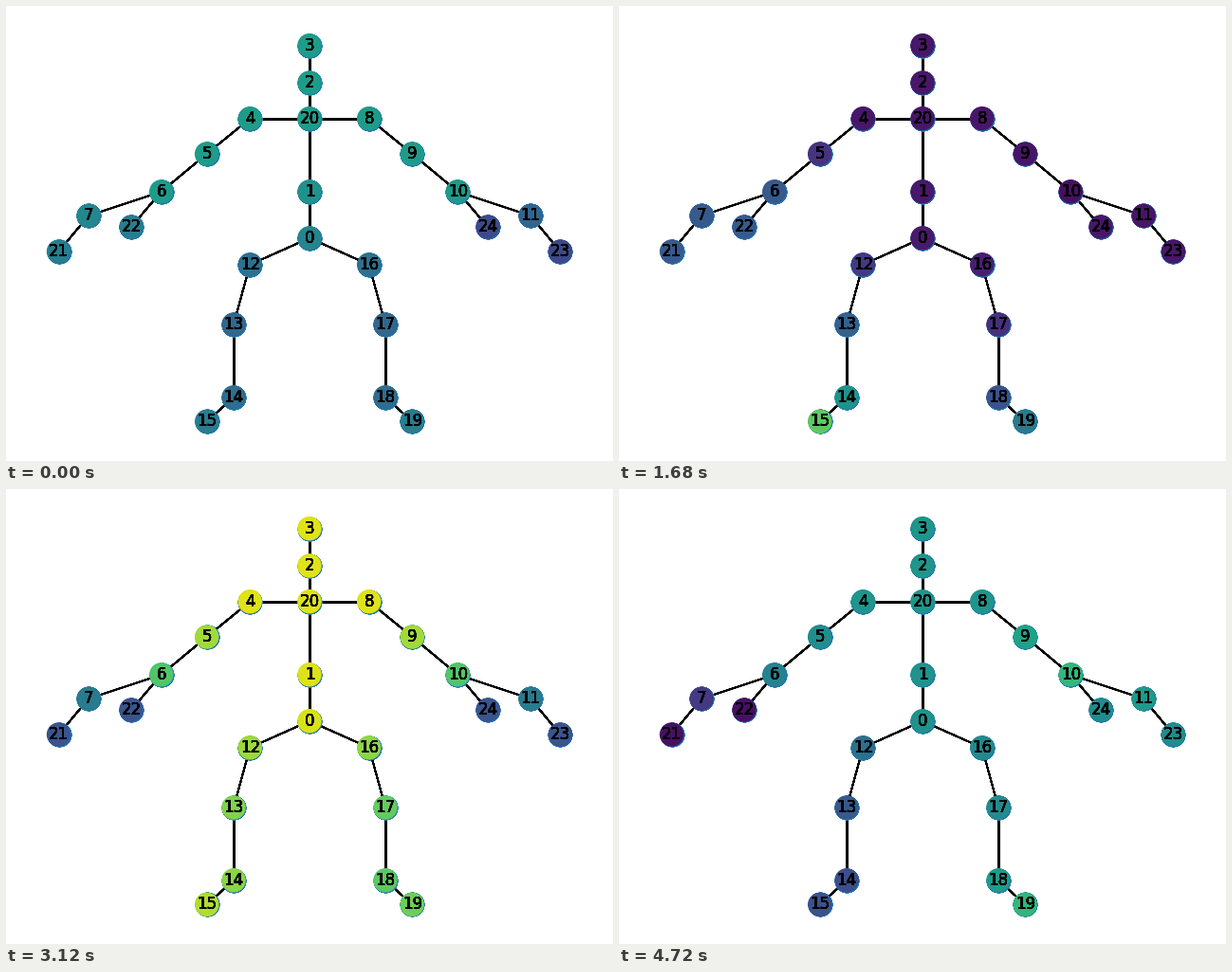
A matplotlib script for the animation above (4.8 s loop, 640 by 480 pixels).

```python
import numpy as np
import matplotlib.pyplot as plt
from matplotlib.animation import FuncAnimation
from matplotlib.collections import LineCollection

W, H, DPI = 640, 480, 100
FRAMES, INTERVAL = 60, 80

SPINE = [3, 2, 20, 1, 0]
ARMS = {"left": [4, 5, 6, 7, 21, 22], "right": [8, 9, 10, 11, 23, 24]}
LEGS = {"left": [12, 13, 14, 15], "right": [16, 17, 18, 19]}

# One half of the body: pixels out from the middle, pixels down.
SPINE_Y = [41.65, 81, 118.7, 195.8, 244.8]
ARM = [(62.7, 118.7), (108.3, 156), (156.2, 195.8), (233, 221.3),
       (264.46, 259), (188, 233)]
LEG = [(62.7, 272.8), (80, 336), (80, 412.8), (108.2, 438.35)]

# Level of a few anchor joints at the key moments; the rest is blended.
KEYS = [0, 12, 21, 30, 39, 50, 59]
ANCHORS = {
    "chest": [.55, .75, .06, .43, .95, .66, .52],
    "pelvis": [.45, .53, .07, .35, .94, .42, .50],
    "left wrist": [.55, .76, .28, .55, .73, .72, .44],
    "left hand": [.42, .39, .28, .24, .26, .72, .04],
    "left foot": [.42, .76, .75, .75, .88, .66, .25],
    "right wrist": [.54, .46, .04, .36, .73, .72, .66],
    "right hand": [.22, .08, .06, .10, .26, .31, .48],
    "right foot": [.42, .53, .41, .40, .78, .53, .66],
}
HIP_DIP = 0.1


def layout():
    pos = np.zeros((25, 2))
    pos[SPINE] = [(W / 2, y) for y in SPINE_Y]
    for side, sign in [("left", -1), ("right", 1)]:
        for joints, shape in [(ARMS[side], ARM), (LEGS[side], LEG)]:
            pos[joints] = [(W / 2 + sign * dx, y) for dx, y in shape]
    return pos


def bones():
    chains = [SPINE]
    for side in ARMS:
        *arm, thumb = ARMS[side]
        chains += [[20] + arm, [arm[2], thumb], [0] + LEGS[side]]
    return [pair for c in chains for pair in zip(c, c[1:])]


def eased(i, values):
    """Value at step i, easing from each key moment to the next."""
    s = np.interp(i, KEYS, range(len(KEYS)))
    k, u = divmod(s, 1)
    return np.interp(k + u * u * (3 - 2 * u), range(len(KEYS)), values)


def joint_levels(i):
    now = {name: eased(i, values) for name, values in ANCHORS.items()}
    chest, pelvis = now["chest"], now["pelvis"]
    out = np.zeros(25)
    out[SPINE] = np.interp([0, 0, 0, .4, 1], [0, 1], [chest, pelvis])
    for side in ARMS:
        arm = [chest, now[side + " wrist"], now[side + " hand"]]
        out[ARMS[side]] = np.interp([0, .4, 1, 1.68, 2, 2], range(3), arm)
        u = np.arange(1, 5) / 4
        leg = pelvis + (now[side + " foot"] - pelvis) * u
        out[LEGS[side]] = leg - HIP_DIP * np.sin(np.pi * u)
    return out


fig = plt.figure(figsize=(W / DPI, H / DPI), dpi=DPI, facecolor="white")
ax = fig.add_axes([0, 0, 1, 1])
ax.set_xlim(0, W)
ax.set_ylim(H, 0)
ax.axis("off")

pos = layout()
segments = [pos[[a, b]] for a, b in bones()]

# Overdrawing hardens the soft edges of lines, discs and digits.
ax.add_collection(LineCollection(segments * 50, colors="black",
                                 linewidths=1, zorder=1))
ax.scatter(*np.tile(pos, (12, 1)).T, s=300, c="#1f77b4", zorder=2)
nodes = ax.scatter(*pos.T, s=300, c=joint_levels(0), cmap="viridis",
                   vmin=0, vmax=1, zorder=3)
for joint, (x, y) in enumerate(pos):
    for _ in range(10):
        ax.text(x, y, str(joint), fontsize=12, family="DejaVu Sans",
                color="black", ha="center", va="center", zorder=4)


def update(i):
    nodes.set_array(joint_levels(i))
    return [nodes]


anim = FuncAnimation(fig, update, frames=FRAMES, interval=INTERVAL,
                     repeat=True, repeat_delay=0, blit=False)
plt.show()
```
